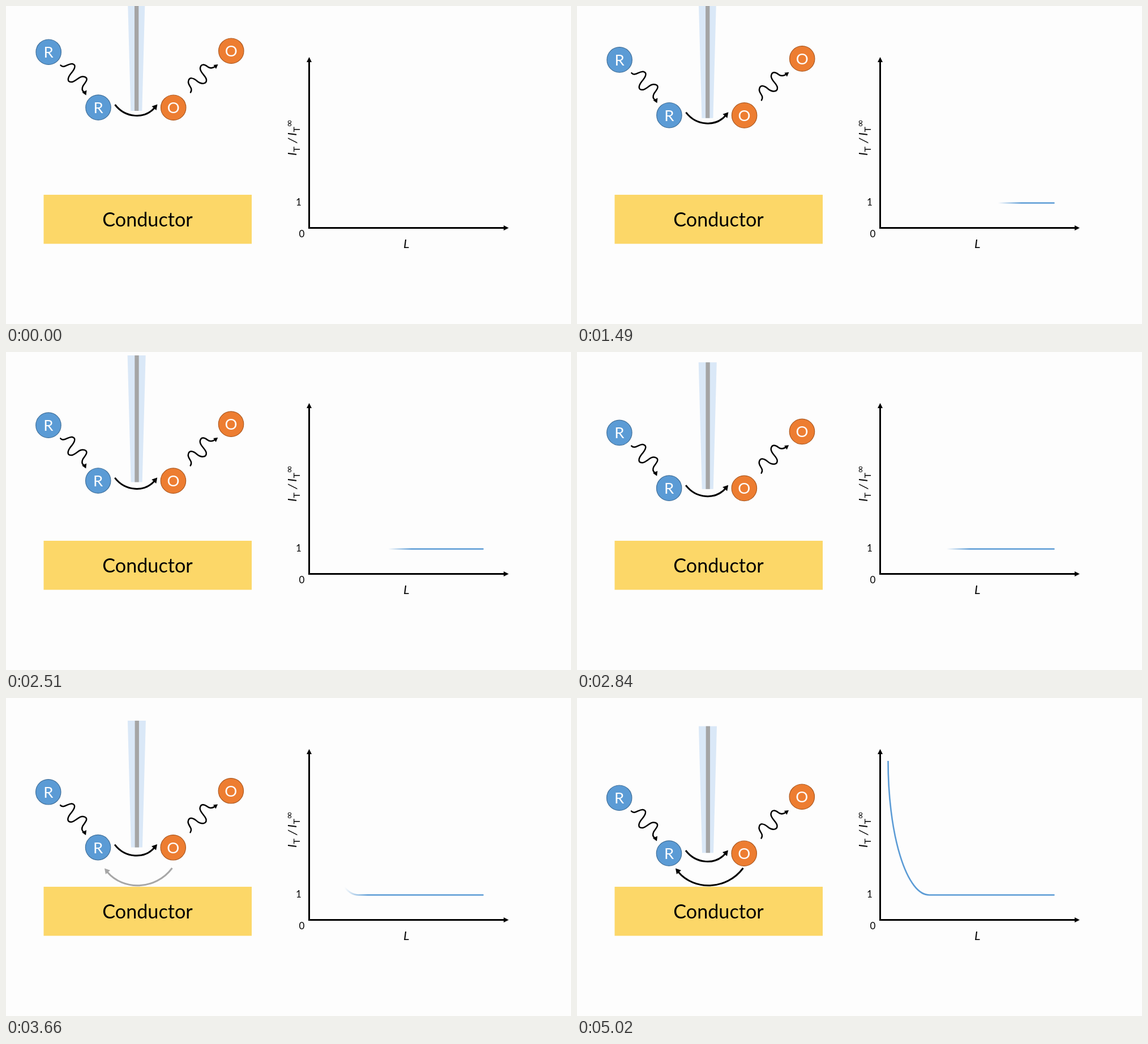
These frames come from a looping animation (998x561 px, 5060 ms). An HTML page:

```html
<!DOCTYPE html>
<html lang="en">
<head>
<meta charset="utf-8">
<title>Approach curve over a conductor</title>
<style>
  html, body { margin: 0; width: 100%; height: 100%; overflow: hidden; background: #fdfdfd; }
  svg { display: block; width: 100%; height: 100%; }
  text { font-family: Lato, "Open Sans", sans-serif; }
  .line { fill: none; stroke: #000; stroke-width: 3; }
  .wave { fill: none; stroke: #000; stroke-width: 2.5; stroke-linecap: round; }
  .letter { font-size: 27.5px; fill: #fff; text-anchor: middle; }
  .italic { font-size: 22px; font-style: italic; }
  .sub { font-size: 16px; }
  .tick { font-size: 17px; text-anchor: middle; }
</style>
</head>
<body>
<svg viewBox="0 0 998 561">
  <defs>
    <linearGradient id="wipe" gradientUnits="userSpaceOnUse" y1="0" y2="0">
      <stop offset="0" stop-color="#5b9bd5" stop-opacity="0"/>
      <stop offset="1" stop-color="#5b9bd5"/>
    </linearGradient>
  </defs>
  <rect width="998" height="561" fill="#fdfdfd"/>

  <rect x="66.5" y="333" width="367.5" height="86.5" fill="#fcd768"/>
  <text x="250" y="389" font-size="34.2" text-anchor="middle">Conductor</text>

  <g id="probe">
    <path d="M214.3 -38.5H246.3L240.3 185H220.3Z" fill="#dae8f7"/>
    <rect x="227" y="-38.5" width="7.3" height="223.5" fill="#a5a5a5"/>
  </g>

  <g id="species">
    <path class="wave" d="M96.500 104.500C102 111 110 101 117 102C126 104 120 113 114 120C108 128 108 135 117 134C125 132 130 122 139 125C147 128 140 135 136 141C133 147 135 150 138 152"/>
    <path d="M141.500 157.500L134.500 152.500L142.500 148.500Z"/>
    <path class="wave" d="M326 152.500C331 145 322 141 322 134C323 124 331 127 337 132C345 139 355 138 354 130C353 123 343 118 343 110C344 101 351 103 356 107C361 111 366 109 369 107"/>
    <path d="M374.500 103L366.500 104L371 111Z"/>
    <path class="line" d="M192.500 174C211 198 245 200 263 179"/>
    <path d="M267.500 173.500L257.500 177L265.500 184Z"/>
  </g>

  <g id="feedback">
    <path class="line" d="M293.500 300C264 339.500 207 340 179 307"/>
    <path d="M174 300.500L176 311L184 304Z"/>
  </g>

  <path class="line" d="M535.500 97V391.500H881"/>
  <path d="M535.500 90L540 99H531ZM888 391.500L879 387V396Z"/>
  <text class="tick" x="517" y="351.500">1</text>
  <text class="tick" x="522.500" y="408">0</text>
  <text class="italic" x="702" y="427">L</text>
  <g transform="translate(513 263) rotate(-90)">
    <text class="italic" x="-1">I</text>
    <text class="sub" x="5.500" y="5.500">T</text>
    <text class="italic" x="21" font-style="italic">/</text>
    <text class="italic" x="34">I</text>
    <text class="sub" x="40.500" y="5.500">T</text>
    <text x="49" y="-6.600" style="font: 17px 'DejaVu Sans', sans-serif">∞</text>
  </g>

  <path d="M549.500 111A72.500 236.500 0 0 0 622 347.500H843.500" fill="none" stroke="url(#wipe)" stroke-width="2.6"/>
</svg>
<script>
  const LOOP = 5060;
  const byId = id => document.getElementById(id);
  const [probe, species, feedback, wipe] = ['probe', 'species', 'feedback', 'wipe'].map(byId);

  const disc = (x, y, letter, fill, stroke) => `
    <circle cx="${x}" cy="${y}" r="22.2" fill="${fill}" stroke="${stroke}" stroke-width="1.2"/>
    <text class="letter" x="${x}" y="${y + 10}">${letter}</text>`;
  const reduced = (x, y) => disc(x, y, 'R', '#5b9bd5', '#41719c');
  const oxidized = (x, y) => disc(x, y, 'O', '#ed7d31', '#ae5a21');
  species.insertAdjacentHTML('beforeend',
    reduced(75.2, 81.2) + reduced(163, 179) + oxidized(397.8, 79.2) + oxidized(295.7, 179.2));

  const progress = (t, start, duration) => Math.min(1, Math.max(0, (t - start) / duration));
  // Constant acceleration, then constant braking.
  const ease = u => u < 0.5 ? 2 * u * u : 1 - 2 * (1 - u) ** 2;

  function draw(t) {
    const down = ease(progress(t, 320, 4362));
    species.setAttribute('transform', `translate(${-0.5 * down} ${95 * down})`);
    probe.setAttribute('transform', `translate(${0.7 * down} ${88.2 * down})`);
    feedback.setAttribute('opacity', progress(t, 2975, 2000));

    const edge = 844 - 336 * progress(t, 0, 5000);
    wipe.setAttribute('x1', edge);
    wipe.setAttribute('x2', edge + 41);
  }

  const begin = performance.now();
  function tick() {
    draw((performance.now() - begin) % LOOP);
    requestAnimationFrame(tick);
  }
  draw(0);
  requestAnimationFrame(tick);
</script>
</body>
</html>
```
